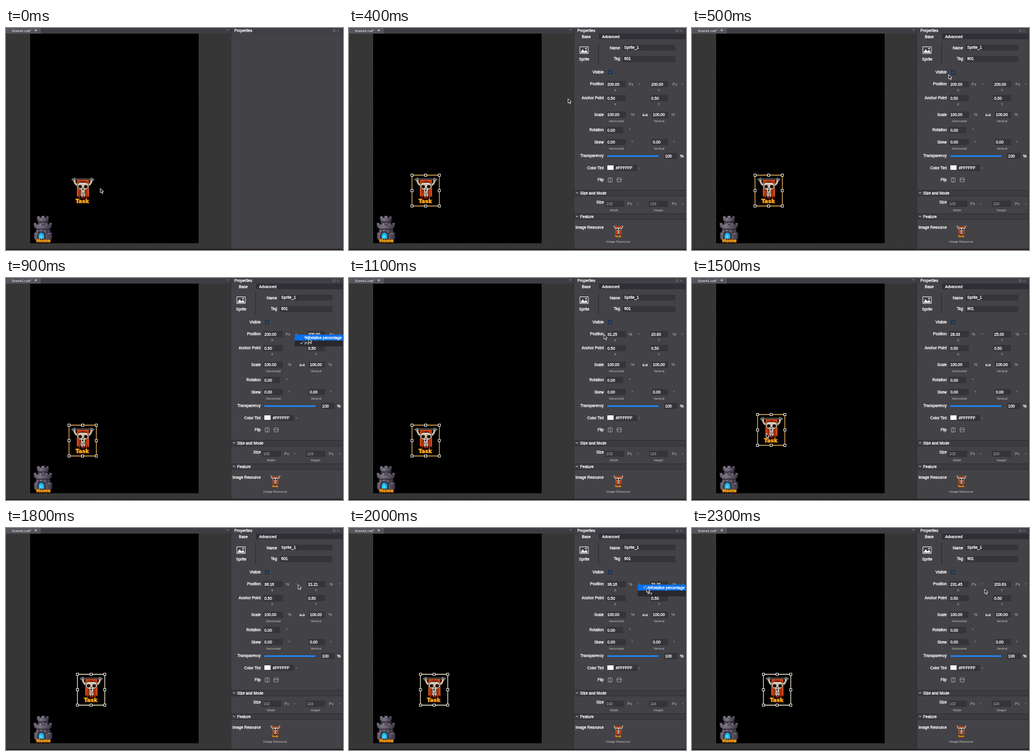
An HTML page for the animation above (2400 ms loop, 600x396 px).

```html
<!DOCTYPE html>
<html lang="en">
<head>
<meta charset="utf-8">
<title>Sprite position units</title>
<style>
  html, body { margin: 0; width: 100%; height: 100%; overflow: hidden; background: #38383a; }
  svg { display: block; width: 600px; height: 396px; }
  text { font: 7px "Liberation Sans", Arial, sans-serif; fill: #fff; white-space: pre; }
  .strong { stroke: #fff; stroke-width: .3px; }
  .dim { fill: #bcbbc0; }
  .small { font-size: 5.8px; fill: #c6c5ca; }
  .logo { font: bold 9px "DejaVu Sans", sans-serif; fill: #ffc928; stroke: #8f3b00;
          stroke-width: 1.8px; paint-order: stroke; stroke-linejoin: round; }
</style>
</head>
<body>
<svg viewBox="0 0 600 396">
  <defs>
    <pattern id="weave" width="8" height="8" patternUnits="userSpaceOnUse">
      <rect width="8" height="8" fill="#373737"/>
      <path d="M2 0L4 2L2 4L0 2ZM6 4L8 6L6 8L4 6Z" fill="#323232"/>
    </pattern>
    <linearGradient id="stone">
      <stop offset="0" stop-color="#5f5866"/>
      <stop offset=".35" stop-color="#7a7282"/>
      <stop offset="1" stop-color="#3b3542"/>
    </linearGradient>
    <linearGradient id="cloth">
      <stop offset="0" stop-color="#d2420f"/>
      <stop offset=".5" stop-color="#8a1408"/>
      <stop offset="1" stop-color="#d2420f"/>
    </linearGradient>
    <g id="task">
      <path d="M-10 -19H11V13L9 9L7 15L5 10L3 14L-2 14L-4 9L-6 14L-8 9L-10 12Z" fill="url(#cloth)"/>
      <path d="M-9.5 -15V10M10.5 -15V11" stroke="#e8702a"/>
      <path d="M-15 -20.5H16" stroke="#4b4644" stroke-width="2.6"/>
      <path d="M-10 -18H11" stroke="#e55a1c" stroke-width="1.4"/>
      <path d="M-20 -20L-14 -23L-12 -18L-16 -16ZM21 -20L15 -23L13 -18L17 -16Z" fill="#66666b" stroke="#929198" stroke-width=".6"/>
      <path d="M-15 -19Q-14 -10 -8 -9M16 -19Q15 -10 9 -9" fill="none" stroke="#b9a995" stroke-width="3.2"/>
      <path d="M-14.5 -18Q-13 -11 -8 -10M15.5 -18Q14 -11 9 -10" fill="none" stroke="#eee3d2"/>
      <path d="M-9 -11Q-8 -15 .5 -14Q9 -15 10 -11L11 -6L7 -2L4 -1L5 8L3 12L1 9L-1 12L-4 8L-3 -1L-6 -2L-10 -6Z" fill="#cfc1ae" stroke="#33211d" stroke-width=".8"/>
      <ellipse cx="-4.5" cy="-7" rx="3.2" ry="3" fill="#1e1111"/>
      <ellipse cx="5.5" cy="-7" rx="3.2" ry="3" fill="#1e1111"/>
      <path d="M-.8 -1L.5 -5L1.8 -1ZM-1.4 3V8M1 2V9M3.2 3V7" fill="#33231f" stroke="#503f38" stroke-width=".8"/>
      <path d="M-7 -12Q.5 -14 8 -12" fill="none" stroke="#fbf5ea" stroke-width="1.2"/>
      <text class="logo" x="-12.6" y="21.5" letter-spacing=".4">Task</text>
    </g>
    <g id="home" stroke="#241f2b" stroke-width=".8">
      <path d="M50 366L54 362H78L82 366V375L79 379H53L50 375Z" fill="url(#stone)"/>
      <path d="M54 354H78L79 366H53Z" fill="url(#stone)"/>
      <path d="M57 342H75V354H57Z" fill="url(#stone)"/>
      <path d="M49 348L54 347V350H59V348H64V351H69V348H74V350H77V347L82 348L81 355L77 358H54L50 355Z" fill="url(#stone)"/>
      <path d="M55 336L60 335V338H63V335H69V338H72V335L76 336V342L73 345H58L55 342Z" fill="url(#stone)"/>
      <path d="M56 337.5H59M64 336.5H68M73 337.5H75M50.5 349.5H53M60 349.5H63M70 349.5H73M78 349.5H81M52 366.5H56M74 366.5H79" stroke="#a69eae" stroke-width="1.2"/>
      <path d="M58 346.5H74M54 359.5H78M59 359V365M66 359V363M73 359V365" stroke="#2b2532" stroke-width="1.2"/>
      <path d="M56 377V370Q57 363 63 363Q69 364 70 370V377Z" fill="#37303f"/>
      <path d="M58 376V370Q59 365 63 365Q68 366 68 371V376Z" fill="#19b0e4" stroke="none"/>
      <path d="M60 375V371Q62 367 65 370V375Z" fill="#45d0fa" stroke="none"/>
      <text class="logo" x="54" y="382" style="font-size:7.8px">Home</text>
    </g>
  </defs>

  <rect width="600" height="396" fill="url(#weave)"/>
  <rect width="400" height="10" fill="#3e3d44"/>
  <rect width="62" height="10" fill="#56555d"/>
  <text x="10.5" y="7.4" style="font-size:6.1px">Scene1.csd*</text>
  <circle cx="53" cy="4" r="2" fill="#aaa9af"/>
  <path d="M392 2L394.5 4.5L397 2" fill="none" stroke="#8e8d94"/>
  <rect x="43" y="10" width="300" height="374" fill="#000"/>
  <rect x="400" width="200" height="396" fill="#434246"/>
  <rect x="400" width="200" height="10" fill="#403f46"/>
  <path d="M400.5 0V396M.5 10V396M599.5 0V396" stroke="#302f34"/>
  <text class="strong" x="406.5" y="7">Properties</text>
  <path d="M582.5 3H586V6.5H582.5ZM589.5 3L593 6.5M593 3L589.5 6.5" fill="none" stroke="#85848b" stroke-width=".7"/>
  <rect y="394" width="600" height="2" fill="#241b20"/>

  <use href="#home"/>
  <g id="sprite">
    <use href="#task"/>
    <g id="selection"></g>
  </g>
  <g id="panel"></g>
  <g id="menu"></g>
  <path id="cursor" d="M0 0V8L1.9 6.4L3.2 9.4L4.7 8.7L3.4 5.8H5.8Z" fill="#111" stroke="#fff" stroke-width=".9"/>
</svg>
<script>
const LOOP = 2400, STEP = 100;
const $ = id => document.getElementById(id);
const text = (x, y, str, cls = 'strong', extra = '') =>
  `<text x="${x}" y="${y}" class="${cls}" ${extra}>${str}</text>`;
const label = (y, str, x = 453.5) =>
  text(x, y, str, 'strong', 'text-anchor="end" style="font-size:6.85px"');
const small = (x, y, str) => text(x, y, str, 'small', 'text-anchor="middle"');
const box = (x, y, w, h, fill) => `<rect x="${x}" y="${y}" width="${w}" height="${h}" fill="${fill}"/>`;
const field = (x, y, w, str, cls) =>
  box(x, y - 8, w, 11, '#353438') + text(x + 2, y, str, cls);
const line = (d, color, width = 1) =>
  `<path d="${d}" fill="none" stroke="${color}" stroke-width="${width}"/>`;
const arrow = (x, y) => `<path d="M${x - 1.5} ${y - 1}h3l-1.5 2.2z" fill="#7d7c83"/>`;

function section(y, str) {
  return box(401, y - 5, 198, 11, '#3d3c41') +
    line(`M401 ${y - 4.5}H599M401 ${y + 5.5}H599`, '#2d2c30') +
    line(`M404 ${y - 1}l2 2l2 -2`, '#ddd') + text(411.5, y + 2.5, str);
}

function panelMarkup(x, y, unit) {
  const pair = (row, a, b, indent = 0) =>
    field(458, row, 35, a) + field(536 + indent, row, 32 - indent, b);
  return box(445, 10, 154, 10, '#302f35') +
    text(414.5, 17.7, 'Base') + text(450.5, 17.7, 'Advanced') +
    line('M411 33.5H426V45.5H411Z', '#eee') +
    '<path d="M412 44L416 38L419 42L422 39L425 44Z" fill="#fff"/><circle cx="422" cy="36.5" r="1.2" fill="#fff"/>' +
    text(409.5, 57.5, 'Sprite') + line('M444.5 26V65', '#29282c') +
    label(38, 'Name', 482.5) + box(487, 30, 94, 10, '#353438') + text(490, 37, 'Sprite_1') +
    label(57, 'Tag', 482.5) + box(487, 50, 94, 11, '#353438') + text(490, 57.3, '901') +
    label(80.5, 'Visible') + box(461, 75, 8, 8, '#25344b') +
    line('M463 79L464.6 80.6L467 77', '#2472c8') +
    label(102.3, 'Position') + pair(102.6, x, y) +
    text(498, 102.5, unit, 'dim') + text(576, 102.5, unit, 'dim') + arrow(517, 100) + arrow(594, 100) +
    small(474, 113.3, 'X') + small(552, 113.3, 'Y') +
    label(127.3, 'Anchor Point') + pair(127.6, '0.50', '0.50') +
    small(474, 138.3, 'X') + small(552, 138.3, 'Y') +
    label(157, 'Scale') + pair(157.2, '100.00', '100.00', 3) +
    text(502, 157, '%', 'dim') + text(574, 157, '%', 'dim') +
    line('M526 154H523.5V156.5H526M528 154H531V156.5H528M525 156H529', '#eee', 1.2) +
    small(476, 167.8, 'Horizontal') + small(552, 167.8, 'Vertical') +
    label(184, 'Rotation') + field(458, 184.5, 30, '0.00') + text(498.5, 185, '°', 'dim') +
    label(205.7, 'Skew') + pair(206, '0.00', '0.00', 3) +
    text(503, 206.5, '°', 'dim') + text(577, 206.5, '°', 'dim') +
    small(476, 216.8, 'Horizontal') + small(552, 216.8, 'Vertical') +
    label(230.3, 'Transparency') + box(460, 227, 92, 3, '#2380e9') +
    '<circle cx="553.5" cy="228.5" r="2.8" fill="#34435b"/>' +
    field(561, 230.8, 24, '100') + text(589.5, 230.8, '%') +
    label(252, 'Color Tint') + field(473, 252.2, 40, '#FFFFFF') + box(460, 245, 11, 8, '#fff') + arrow(517, 250) +
    label(272.7, 'Flip') +
    line('M461.5 267.5H468.5V274.5H461.5ZM465 266V276M477.5 267.5H484.5V274.5H477.5ZM476 270.5H486', '#a2a1a7', .9) +
    section(294, 'Size and Mode') +
    label(313, 'Size') + field(456, 316, 34, '102', 'dim') + field(534, 316, 34, '116', 'dim') +
    text(495.5, 316, 'Px', 'dim') + text(575, 316, 'Px', 'dim') + arrow(514, 313.5) + arrow(594, 313.5) +
    small(472, 326.5, 'Width') + small(551, 326.5, 'Height') +
    section(336, 'Feature') + label(357.5, 'Image Resource') +
    '<use href="#task" transform="translate(479.5 362.5) scale(.47)"/>' +
    small(479.3, 383, 'Image Resource');
}

function menuMarkup(hover, checked) {
  return box(514, 101, 86, 21, '#29282d') + box(514, 101 + hover * 10.5, 86, 10.5, '#0870ed') +
    text(531.5, 108.6, '%Relative percentage', 'strong', 'style="font-size:6.75px"') +
    text(531.5, 118.8, 'Px', '') +
    line(`M524 ${105.5 + checked * 10.5}l1.6 2l3 -4.5`, '#eee');
}

const sides = [-1, 0, 1];
const handles = sides.flatMap(i => sides.filter(j => i || j).map(j =>
  `<rect x="${i * 24.3 - 2}" y="${j * 27.5 - 2}" width="4" height="4" fill="#000" stroke="#fff"/>`)).join('');
const selectionMarkup = color => line('M-24.3 -27.5H24.3V27.5H-24.3Z', color, 1.3) +
  '<circle r="2.2" fill="#222" stroke="#fff"/>' + handles;

// [start time, ...value]: each value holds until the next entry
const cursorPath = [
  [0, 168, 286], [100, 148, 287], [200, 140, 288], [300, 250, 218], [400, 390, 126],
  [500, 457, 83], [600, 498, 96], [700, 516, 100], [800, 525, 104], [900, 539, 108],
  [1000, 515, 106], [1100, 454, 101], [1200, 127, 297], [1300, 126, 290], [1400, 119, 278],
  [1500, 132, 277], [1600, 142, 295], [1700, 330, 198], [1800, 520, 101],
  [2000, 530, 107], [2100, 538, 115], [2200, 526, 111], [2300, 521, 109]];
const spritePath = [[0, 136.5, 290], [1300, 135, 283], [1400, 128, 271.5],
  [1500, 141, 271], [1600, 151.5, 288.5]];
const outlines = [[0, '#eab45e'], [1600, '#f1e6cc']];
const readings = [[0, '200.00', '200.00', 'Px'], [1000, '31.25', '20.83', '%'],
  [1400, '30.68', '22.47', '%'], [1500, '28.33', '25.00', '%'], [1600, '32.67', '25.11', '%'],
  [1700, '36.16', '21.21', '%'], [2200, '231.45', '203.63', 'Px']];
const menus = [[0], [800, 0, 1], [1000], [1900, 0, 0], [2100, 1, 0], [2200]];
const at = (track, t) => track.filter(entry => entry[0] <= t).pop().slice(1);

let shown = -1;
function render(time) {
  const t = Math.floor(time % LOOP / STEP) * STEP;
  if (t === shown) return;
  shown = t;
  const selected = t >= 200, menu = at(menus, t);
  $('cursor').setAttribute('transform', `translate(${at(cursorPath, t)})`);
  $('sprite').setAttribute('transform', `translate(${at(spritePath, t)})`);
  $('selection').innerHTML = selected ? selectionMarkup(...at(outlines, t)) : '';
  $('panel').innerHTML = selected ? panelMarkup(...at(readings, t)) : '';
  $('menu').innerHTML = menu.length ? menuMarkup(...menu) : '';
}

const start = performance.now();
function tick() {
  render(performance.now() - start);
  requestAnimationFrame(tick);
}
tick();
</script>
</body>
</html>
```
